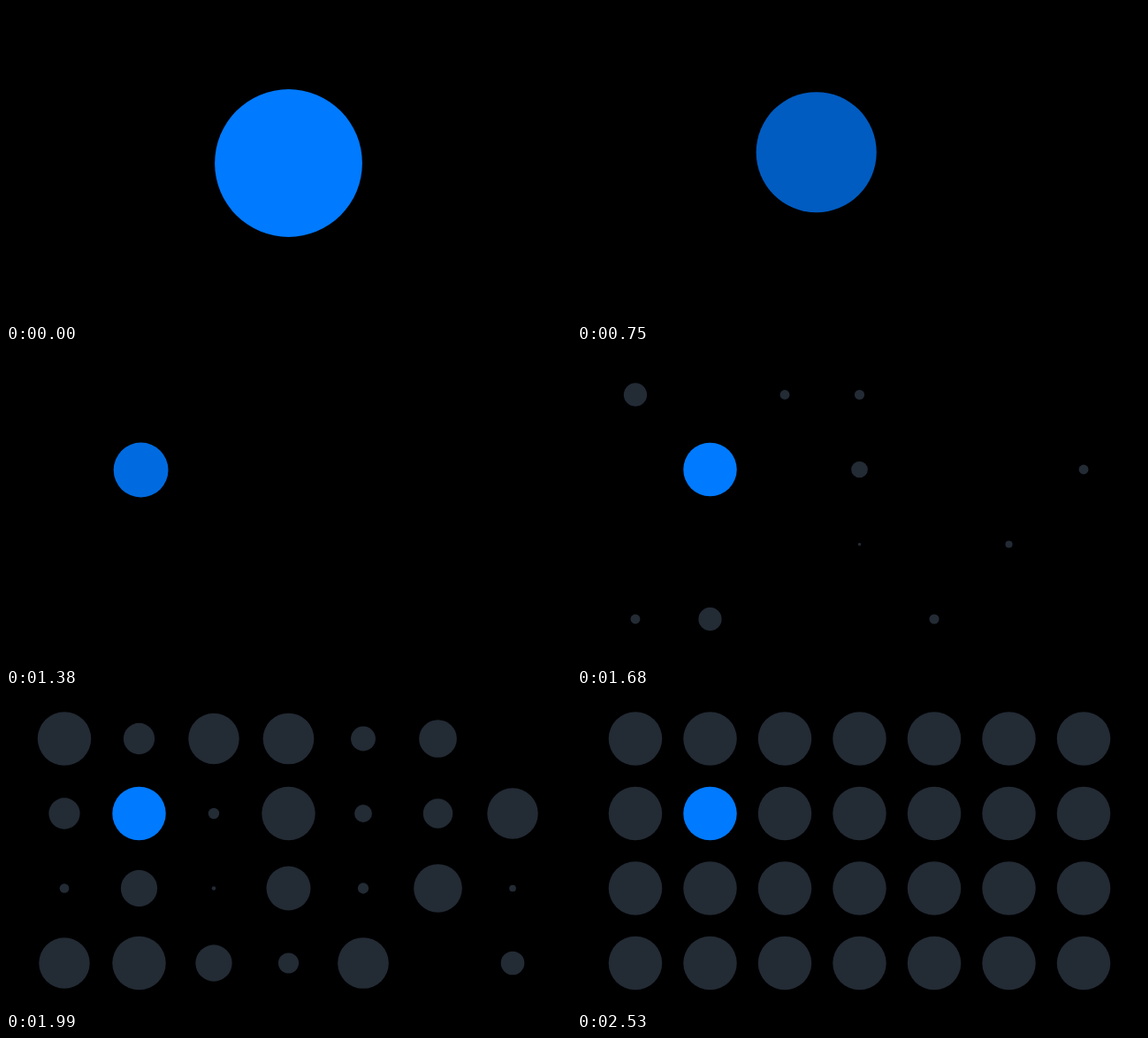
Write an HTML page without scripts that moves like this. It is 639 px wide and 357 px high and loops after 2840 ms.

```html
<!DOCTYPE html>
<html lang="en">
<head>
<meta charset="utf-8">
<title>Dot to grid</title>
<style>
  /* One stepped clock (13 ticks a second) drives every shape. */
  @property --tick {
    syntax: "<number>";
    inherits: true;
    initial-value: 0;
  }
  @keyframes clock {
    from { --tick: 0; }
    to { --tick: 37; }
  }
  html, body {
    margin: 0;
    width: 100%;
    height: 100%;
    overflow: hidden;
    background: #000;
  }
  svg {
    display: block;
    width: 100%;
    height: 100%;
    animation: clock 2840ms steps(37) -20ms infinite;
  }

  /* Each grey dot grows linearly from its own start tick. */
  .grid circle {
    fill: #232b35;
    r: calc(30.25px * clamp(0, (var(--tick) - var(--s)) / 5.2, 1));
  }

  /* --p is an ease-in-out curve over time --v, centred on zero. */
  .lead {
    --v: calc(clamp(0, (var(--tick) - 4.5) / 14.75, 1) - 0.5);
    --u: calc(var(--v) * (1.149 - 0.597 * var(--v) * var(--v)));
    --p: calc(0.5 + 1.5 * var(--u) - 2 * var(--u) * var(--u) * var(--u));
    --light: clamp(0.755, max(1 - 0.08 * (var(--tick) - 4), 1 - 0.08 * (19.5 - var(--tick))), 1);
    cx: calc(319.5px - 169px * var(--p));
    cy: calc(177.5px - 42.5px * var(--p));
    r: calc(83.4px - 53.15px * var(--p));
    fill: rgb(0, calc(122 * var(--light)), calc(255 * var(--light)));
  }
</style>
</head>
<body>
<svg viewBox="0 0 639 357">
  <g class="grid">
    <g transform="translate(66 50.5)">
      <circle style="--s:19.74"/>
      <circle cx="84.5" style="--s:22.97"/>
      <circle cx="169" style="--s:21.06"/>
      <circle cx="253.5" style="--s:21.04"/>
      <circle cx="338" style="--s:23.6"/>
      <circle cx="422.5" style="--s:22.33"/>
      <circle cx="507" style="--s:26.25"/>
    </g>
    <g transform="translate(66 135)">
      <circle style="--s:22.97"/>
      <circle cx="169" style="--s:24.93"/>
      <circle cx="253.5" style="--s:20.39"/>
      <circle cx="338" style="--s:24.29"/>
      <circle cx="422.5" style="--s:23.12"/>
      <circle cx="507" style="--s:21.06"/>
    </g>
    <g transform="translate(66 219.5)">
      <circle style="--s:25.08"/>
      <circle cx="84.5" style="--s:22.45"/>
      <circle cx="169" style="--s:25.6"/>
      <circle cx="253.5" style="--s:21.7"/>
      <circle cx="338" style="--s:24.94"/>
      <circle cx="422.5" style="--s:21.3"/>
      <circle cx="507" style="--s:25.34"/>
    </g>
    <g transform="translate(66 304)">
      <circle style="--s:21.06"/>
      <circle cx="84.5" style="--s:19.74"/>
      <circle cx="169" style="--s:22.45"/>
      <circle cx="253.5" style="--s:24.01"/>
      <circle cx="338" style="--s:21.04"/>
      <circle cx="422.5" style="--s:26.9"/>
      <circle cx="507" style="--s:23.71"/>
    </g>
  </g>
  <circle class="lead"/>
</svg>
</body>
</html>
```
